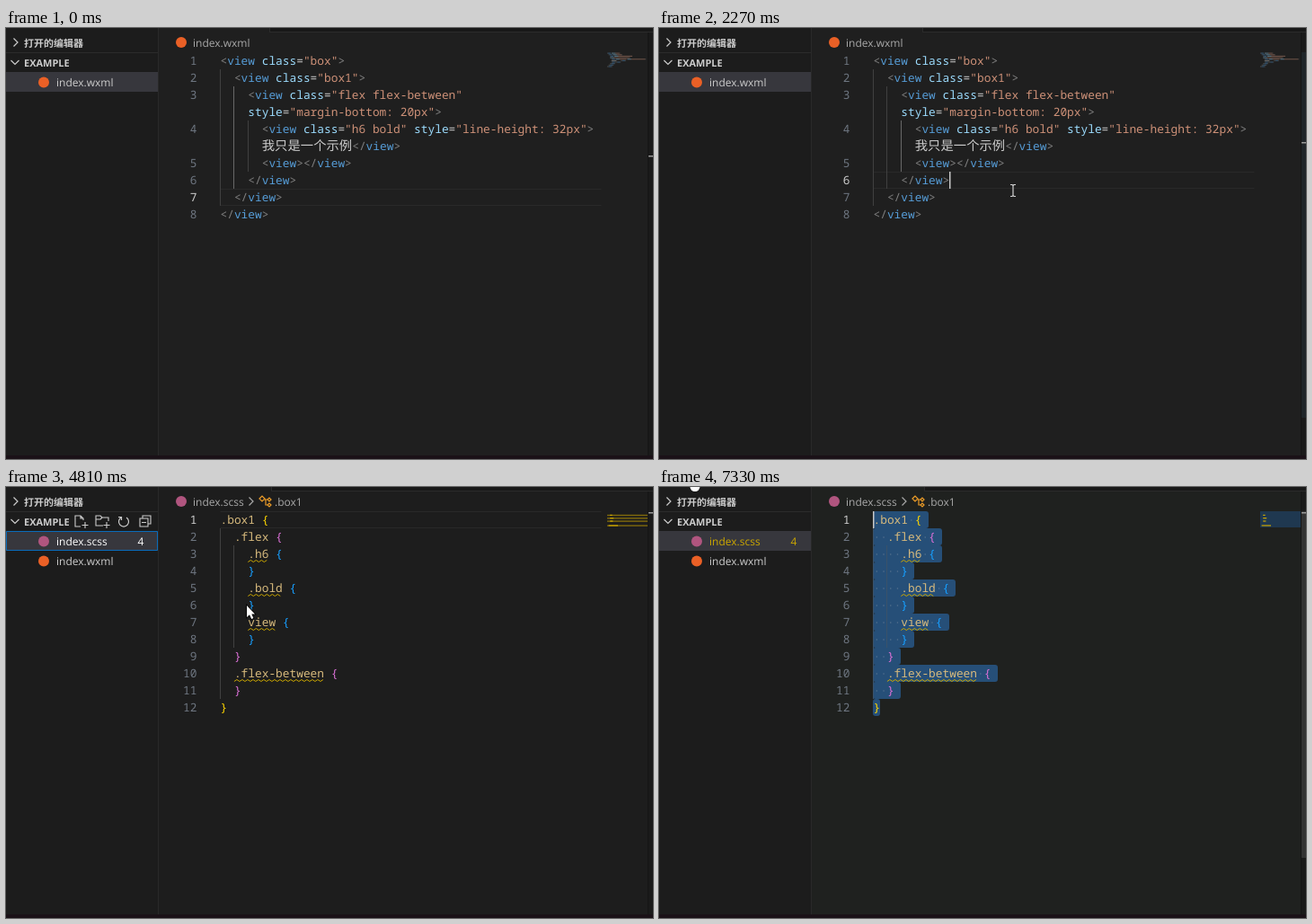
An HTML page with a canvas that plays this animation: 720 by 480 pixels, repeating every 7420 ms.

```html
<!DOCTYPE html>
<html lang="zh">
<head>
<meta charset="utf-8">
<title>Editor demo</title>
<style>
html, body { margin: 0; width: 100%; height: 100%; overflow: hidden; background: #1f1f1f; }
canvas { display: block; }
</style>
</head>
<body>
<canvas id="stage" width="720" height="480"></canvas>
<script>
const ctx = document.getElementById('stage').getContext('2d');
const LOOP = 7420, STEP = 90;
const LEFT = 238.5, CHAR = 7.7, TOP = 27, ROW = 19, CJK = 14.36;
const UI = '"Open Sans", "Noto Sans CJK SC", "Noto Sans CJK", sans-serif';
const MONO = '"Noto Sans Mono", "Noto Sans CJK SC", "Noto Sans CJK", monospace';
const TEXT = '#cccccc', WARN = '#cca700', ORANGE = '#ea6026', PINK = '#b0557f';
const isCjk = s => /[^\x00-\x7f]/.test(s);
const clamp = (v, a, b) => Math.max(a, Math.min(b, v));

const WXML = [
  '<view class="box">',
  '  <view class="box1">',
  '    <view class="flex flex-between"',
  '    style="margin-bottom: 20px">',
  '      <view class="h6 bold" style="line-height: 32px">',
  '      我只是一个示例</view>',
  '      <view></view>',
  '    </view>',
  '  </view>',
  '</view>'];
const WXML_NUMBERS = [1, 2, 3, '', 4, '', 5, 6, 7, 8];
const SCSS = [
  '.box1 {', '  .flex {', '    .h6 {', '    }', '    .bold {', '    }',
  '    view {', '    }', '  }', '  .flex-between {', '  }', '}'];
const UNUSED = [2, 4, 6, 9];

function wxmlTokens(line) {
  let col = 0, prev = '';
  return line.match(/<\/?|>|"[^"]*"|=|[\w-]+| +|[^\x00-\x7f]+/g).map(text => {
    const color = /[<>]/.test(text) ? '#808080' : text[0] === '"' ? '#ce9178'
      : text === '=' || isCjk(text) ? TEXT : prev[0] === '<' ? '#569cd6' : '#9cdcfe';
    const token = { text, col, color };
    col += text.length * (isCjk(text) ? CJK / CHAR : 1);
    prev = text;
    return token;
  });
}
function scssTokens(line) {
  const bracket = ['#ffd700', '#da70d6', '#179fff'][line.search(/\S/) / 2];
  return [...line.matchAll(/[.\w-]+|[{}]/g)].map(m => (
    { text: m[0], col: m.index, color: /[{}]/.test(m[0]) ? bracket : '#d7ba7d' }));
}
const wxmlRows = WXML.map(wxmlTokens), scssRows = SCSS.map(scssTokens);

// Pointer stops: time, x, y
const POINTER = [
  [180, 540, 310], [270, 392, 168], [450, 386, 168], [810, 362, 162], [1190, 362, 161],
  [1460, 362, 161], [1550, 366, 158], [1730, 366, 158], [1910, 392, 173], [2180, 392, 173],
  [2270, 394, 181], [3440, 394, 181], [3530, 150, 110], [3620, 110.5, 97], [3980, 88, 64],
  [4720, 88, 64], [4810, 268, 132], [4990, 252, 262], [5440, 252, 262],
  [6070, 161, 7.5], [6160, 148, -14]];

function pointerAt(t) {
  const i = POINTER.findIndex(p => p[0] > t);
  if (i < 1) return null;
  const [t0, x0, y0] = POINTER[i - 1], [t1, x1, y1] = POINTER[i];
  const k = (t - t0) / (t1 - t0);
  return [x0 + (x1 - x0) * k, y0 + (y1 - y0) * k];
}

function rect(x, y, w, h, color) {
  ctx.fillStyle = color;
  ctx.fillRect(x, y, w, h);
}
function round(x, y, w, h, r, fill, stroke) {
  ctx.beginPath();
  ctx.roundRect(x, y, w, h, r);
  if (fill) { ctx.fillStyle = fill; ctx.fill(); }
  if (stroke) { ctx.strokeStyle = stroke; ctx.lineWidth = 1; ctx.stroke(); }
}
function dot(x, y, r, color) {
  ctx.fillStyle = color;
  ctx.beginPath();
  ctx.arc(x, y, r, 0, 7);
  ctx.fill();
}
function path(d, color, width = 1.2, x = 0, y = 0) {
  ctx.save();
  ctx.translate(x, y);
  ctx.strokeStyle = color;
  ctx.lineWidth = width;
  ctx.stroke(new Path2D(d));
  ctx.restore();
}
function label(s, x, y, color = TEXT, size = 12, align = 'left', weight = '') {
  ctx.font = `${weight} ${size}px ${UI}`;
  ctx.fillStyle = color;
  ctx.textAlign = align;
  ctx.fillText(s, x, y + 4.5);
}
function mono(s, x, y, color, weight = 500) {
  ctx.fillStyle = color;
  ctx.textAlign = 'left';
  for (const c of s) {
    const wide = isCjk(c);
    ctx.font = wide ? `14.3px ${MONO}` : `${weight} 12.83px ${MONO}`;
    ctx.fillText(c, x, y + 4.5);
    x += wide ? CJK : CHAR;
  }
}
const rowY = row => TOP + ROW * row;
const colX = col => Math.floor(LEFT + col * CHAR);
const chevronRight = (x, y, c = TEXT) => path('M-2.5-4.5L2 0L-2.5 4.5', c, 1.2, x, y);

function sidebar(t, pointer) {
  rect(0, 0, 169, 480, '#1c1c1c');
  rect(169, 0, 1, 480, '#292929');
  rect(0, 27, 169, 1, '#2b2b2b');
  chevronRight(11, 16);
  label('打开的编辑器', 20, 16, TEXT, 11, 'left', 'bold');
  path('M-4.5-2.5L0 2L4.5-2.5', TEXT, 1.2, 10, 38.5);
  label('EXAMPLE', 20, 38, TEXT, 11, 'left', 'bold');
  if (t >= 3530 && t < 5440) {
    path('M3-1V-3L0-6H-6V6H0M0-6V-3H3M5 1V8M1.5 4.5H8.5', TEXT, 1.1, 83, 38);
    path('M7 0V-4H0L-2-6H-7V5H1M-7-2H-2L0-4M5 1V8M1.5 4.5H8.5', TEXT, 1.1, 107, 38);
    path('M-3-4.5A5.5 5.5 0 1 0 3-4.5M-6-5H-2.5V-1.5', TEXT, 1.2, 131, 38.5);
    path('M-3-3V-6H6V3H3M-6-3H3V6H-6ZM-4 1.5H1', TEXT, 1.1, 155, 38);
  }
  const files = t >= 2900 ? ['index.scss', 'index.wxml'] : ['index.wxml'];
  const selected = t >= 4360 ? 0 : files.length - 1;
  const focused = t >= 1190 && t < 2270 || t >= 4360 && t < 5440;
  files.forEach((name, i) => {
    const y = 49 + 22 * i, mid = y + 11.5, style = name === 'index.scss';
    const hover = t >= 3530 && t < 4720 && pointer[1] >= y && pointer[1] < y + 22;
    if (i === selected) rect(0, y, 169, 22, '#37373d');
    else if (hover) rect(0, y, 169, 22, '#2a2d2e');
    if (i === selected && focused) round(.5, y + .5, 168, 21, 0, '', '#0a6cba');
    const warned = style && t >= 4450;
    const color = warned ? (focused ? '#ffffff' : WARN) : TEXT;
    dot(42, mid, 6, style ? PINK : ORANGE);
    label(name, 56, mid, color);
    if (warned) label('4', 150, mid, color, 12, 'center');
  });
}

function breadcrumb(scss) {
  const edge = scss ? 295 : 293;
  rect(edge, 0, 720 - edge, 4, '#181818');
  rect(edge, 4, 720 - edge, 1, '#2b2b2b');
  rect(edge, 0, 1, 5, '#2b2b2b');
  dot(195, 16, 6, scss ? PINK : ORANGE);
  label(scss ? 'index.scss' : 'index.wxml', 208, 16, '#a9a9a9');
  if (!scss) return;
  chevronRight(273, 16, '#a9a9a9');
  path('M-6-3L-3-6L0-3L-3 0ZM-1-2H3M1-2V4H3M3-2L5-4L7-2L5 0ZM3 4L5 2L7 4L5 6Z', '#ee9d28', 1.2, 288, 16);
  label('.box1', 299, 16, '#a9a9a9');
}

function guide(col, from, to, color = '#404040') {
  rect(colX(col), rowY(from), 1, (to - from) * ROW, color);
}
function activeLine(row) {
  rect(LEFT, rowY(row), 424, 1, '#292929');
  rect(LEFT, rowY(row + 1) - 1, 424, 1, '#292929');
}
function codeRows(rows, numbers, active) {
  rows.forEach((tokens, row) => {
    const y = rowY(row) + 9.5, n = String(numbers[row]);
    mono(n, 212.5 - n.length * CHAR, y, row === active ? TEXT : '#6e7681', 400);
    for (const k of tokens) mono(k.text, LEFT + k.col * CHAR, y, k.color);
  });
}
const mapY = row => 27.5 + row * 1.65;
function minimapToken({ text, col, color }, row, tint = color) {
  if (text.trim()) rect(669 + col * .8, mapY(row), text.length * .8, 1.2, tint);
}
function caret(row, col) {
  rect(colX(col), rowY(row), 1.5, ROW, '#c8c8c8');
}
function ruler(y, slider, sliderColor) {
  rect(714, 5, 6, 475, '#1a1a1a');
  rect(714, 5, 1, 475, '#151515');
  if (slider) rect(715, 27, 5, slider, sliderColor);
  rect(715, y, 5, 1.5, '#9a9a9a');
}

function wxmlEditor(t) {
  const active = t < 1190 ? 8 : 7, bright = '#686868';
  activeLine(active);
  guide(0, 1, 9);
  guide(2, 2, 8, active === 8 ? bright : undefined);
  guide(4, 4, 7, active === 7 ? bright : undefined);
  codeRows(wxmlRows, WXML_NUMBERS, active);
  ctx.globalAlpha = .4;
  wxmlRows.forEach((tokens, row) => tokens.forEach(k => minimapToken(k, row)));
  ctx.globalAlpha = 1;
  ruler(active === 8 ? 142 : 127, t >= 90 ? 407 : 0, '#1f2529');
  if (t >= 2270 && t < 2720 || t >= 3260 && t < 3800) caret(7, 11);
}

function selection(row, col) {
  for (let r = row; r < SCSS.length; r++) {
    const start = r === row ? col : 0;
    const end = SCSS[r].length + (r < SCSS.length - 1 ? 1 : 0);
    round(colX(start), rowY(r), colX(end) - colX(start), ROW, 3, '#264f78');
    for (let c = start; c < SCSS[r].length; c++)
      if (SCSS[r][c] === ' ') dot(LEFT + (c + .5) * CHAR, rowY(r) + 10, .8, '#54728f');
  }
}
function squiggle({ text, col }, row) {
  const x0 = LEFT + col * CHAR, x1 = x0 + text.length * CHAR, y = rowY(row) + 17.5;
  let d = `M${x0} ${y + 1}`;
  for (let x = x0 + 3, up = true; x <= x1; x += 3, up = !up) d += `L${x} ${y + (up ? -1 : 1)}`;
  path(d, WARN, 1);
}
function scssEditor(t, pointer) {
  const dragging = t >= 5440;
  const [x, y] = pointer || [0, 0];
  const row = dragging ? clamp(Math.floor((y - TOP) / ROW), 0, 11) : 0;
  const col = clamp(Math.round((x - LEFT) / CHAR), 0, SCSS[row].length);
  if (dragging) selection(row, col);
  else activeLine(0);
  const guideColor = dragging ? '#3a526a' : '#404040';
  guide(0, 1, 11, guideColor);
  guide(2, 2, 8, guideColor);
  codeRows(scssRows, SCSS.map((_, i) => i + 1), row);
  if (dragging) rect(669, 27, 45, 18, '#1f3850');
  if (t >= 4450) for (const r of UNUSED) {
    const name = scssRows[r][0];
    squiggle(name, r);
    if (!dragging) rect(669, mapY(r), 45, 1.4, '#806a0c');
    minimapToken(name, r, WARN);
  }
  ruler(28, dragging ? 386 : 0, '#333333');
  if (dragging && (t < 6660 || t >= 7160)) caret(row, col);
}

const MENU = [
  [177, 'creatScssWxml', ''], [203, '转到定义', 'F12'], [229, '快速查看', '>'],
  [266, '更改所有匹配项', 'Ctrl+F2'], [292.5, '格式化文档', 'Shift+Alt+F'],
  [318.5, '使用...格式化文档', ''], [344.5, '重构...', 'Ctrl+Shift+R'],
  [381, 'Open Changes', '>'], [418, '剪切', 'Ctrl+X'], [444.5, '复制', 'Ctrl+C'], [470, '粘贴', 'Ctrl+V']];

function contextMenu(hovered) {
  ctx.save();
  ctx.shadowColor = '#0009';
  ctx.shadowBlur = 8;
  round(362.5, 158.5, 245, 340, 5, '#1f1f1f');
  ctx.restore();
  round(362.5, 158.5, 245, 340, 5, '', '#454545');
  if (hovered) round(367, 165, 236, 25, 4, '#0078d4');
  for (const y of [246, 362, 398]) rect(363, y, 244, 1, '#454545');
  for (const [y, name, key] of MENU) {
    label(name, 392, y, hovered && y === 177 ? '#ffffff' : TEXT, isCjk(name) ? 13 : 12.2);
    if (key === '>') chevronRight(587, y - 1);
    else label(key, 577.5, y, TEXT, 12.8, 'right');
  }
}

function drawPointer(t, [x, y]) {
  if (t < 1190 || t >= 2270 && t < 3530 || t >= 4900) {
    path('M-3-6.5H-1L0-5.5L1-6.5H3M0-5.5V5.5M-3 6.5H-1L0 5.5L1 6.5H3', '#d0d0d0', 1.2, x, y);
    return;
  }
  const arrow = new Path2D('M0 0V13L3 10.3L5.2 15L7.4 14L5.3 9.5H9Z');
  ctx.save();
  ctx.translate(x, y);
  ctx.strokeStyle = '#000';
  ctx.lineWidth = 1.5;
  ctx.stroke(arrow);
  ctx.fillStyle = '#fff';
  ctx.fill(arrow);
  ctx.restore();
}

function draw(ms) {
  const shift = ms < 1190 ? 0 : ms < 4360 ? 20 : 40;
  const t = shift + Math.floor((ms - shift) / STEP + 1e-6) * STEP;
  const pointer = pointerAt(t), scss = t >= 4360;
  ctx.textRendering = 'geometricPrecision';
  rect(0, 0, 720, 480, t >= 5440 ? '#1f211f' : scss ? '#1d1d1d' : '#1f1f1f');
  breadcrumb(scss);
  if (scss) scssEditor(t, pointer);
  else wxmlEditor(t);
  sidebar(t, pointer);
  if (t >= 1190 && t < 2270) contextMenu(t >= 1820);
  rect(0, 476, 720, 4, '#1a1117');
  if (pointer) drawPointer(t, pointer);
  if (t >= 7240) dot(40, -.5, 5.5, '#fff');
}

function frame() {
  draw(performance.now() % LOOP);
  requestAnimationFrame(frame);
}
frame();
</script>
</body>
</html>
```
